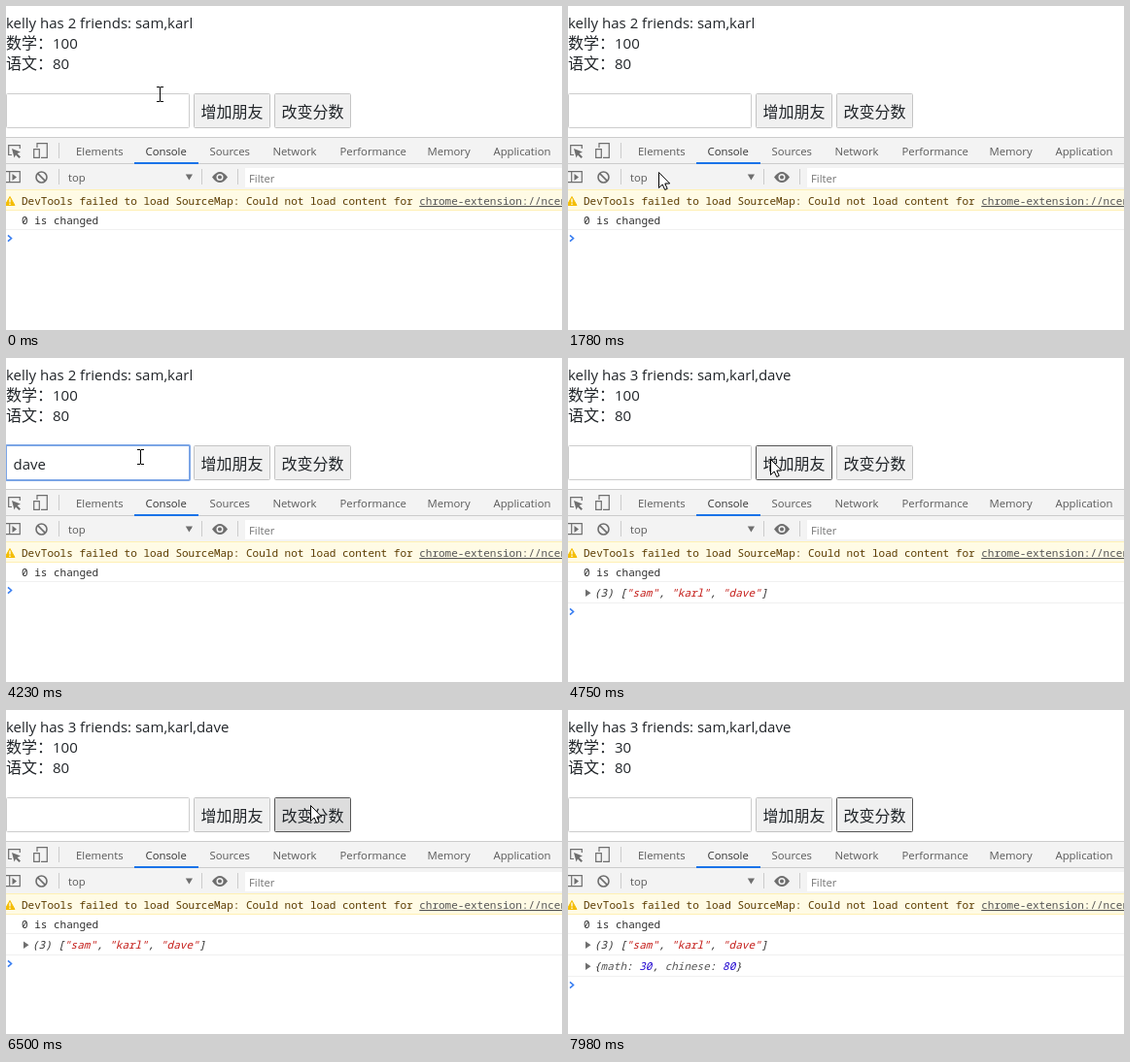
Write an HTML page that moves like this. It is 572 px wide and 334 px high and loops after 8.1 s.

```html
<!DOCTYPE html>
<html lang="zh">
<head>
<meta charset="utf-8">
<style>
  html, body { margin: 0; width: 572px; height: 334px; overflow: hidden; background: #fff; }
  svg { display: block; }
  text { white-space: pre; }
  .page { font: 15px "Open Sans", sans-serif; fill: #212529; }
  .cjk { font: 16px "Noto Sans CJK SC", "Noto Sans CJK", sans-serif; fill: #212529; }
  .ui { font: 11.3px "Open Sans", sans-serif; fill: #5a5a5a; }
  .mono { font: 11px "Noto Sans Mono", monospace; fill: #303030; }
  .value { font-style: italic; }
  .str { fill: #c41a16; }
  .num { fill: #1c00cf; }
  .key { fill: #565656; }
  .icon { fill: none; stroke: #6e6e6e; stroke-width: 1.2; }
  .solid { fill: #6e6e6e; }
  .line { stroke: #ccc; }
  .row { stroke: #f0f0f0; }
</style>
</head>
<body>
<svg width="572" height="334" viewBox="0 0 572 334">
  <text id="friends" class="page" y="23"></text>
  <text class="cjk" y="44">数学：</text><text id="math" class="page" x="48" y="43.500"></text>
  <text class="cjk" y="65">语文：</text><text class="page" x="48" y="64.500">80</text>

  <rect id="field" fill="#fff"/>
  <text id="typed" class="page" x="7.500" y="114.500"></text>
  <path id="caret" stroke="#000"/>
  <rect id="add" x="193.5" y="90.5" width="78" height="35" rx="1"/>
  <text class="cjk" x="200.500" y="115">增加朋友</text>
  <rect id="change" x="276.5" y="90.5" width="78" height="35" rx="1"/>
  <text class="cjk" x="283.500" y="115">改变分数</text>

  <rect y="135" width="572" height="54" fill="#f3f3f3"/>
  <path class="line" d="M0 135.500H572M0 162.500H572M54.500 141V157M54.500 168V184M201.500 168V184M238.500 168V184"/>
  <rect x="132" y="161" width="66" height="2" fill="#1a73e8"/>
  <g id="tabs" class="ui"></g>
  <g class="icon">
    <path d="M6 153.500H2.700V143.700H14.300V147"/>
    <path d="M32 146V141.700H42.300V156.300H36M28.700 147.700H34.300V156.300H28.700Z"/>
    <path d="M0 170.700H14.300V181.700H0M3.700 170V182"/>
    <circle cx="36.500" cy="176.500" r="5.500" stroke-width="1.600"/><path d="M32.600 172.600L40.400 180.400" stroke-width="1.600"/>
  </g>
  <g class="solid">
    <path d="M6 147L15 150.500 11.500 152 15 155.500 13.500 157 10 153.500 8.500 156.500Z"/>
    <path d="M6.500 173V180L11 176.500Z"/>
    <path d="M184.800 173.500H192L188.400 179.500Z"/>
    <path d="M212 176.500Q220 165.500 228 176.500Q220 187.500 212 176.500Z"/>
  </g>
  <circle cx="220" cy="176.500" r="2.800" fill="#6e6e6e" stroke="#f3f3f3" stroke-width="1.500"/>
  <text class="ui" x="64" y="181">top</text>
  <rect x="246" y="167" width="326" height="20" fill="#fff"/>
  <text class="ui" x="250" y="182" style="fill:#757575">Filter</text>

  <rect y="189" width="572" height="22" fill="#fffbe5"/>
  <path d="M0 189.500H572M0 210.500H572" stroke="#fff0b3"/>
  <path d="M-1 205.500L4 196.500 9 205.500Z" fill="#f4bd00" stroke="#f4bd00" stroke-linejoin="round"/>
  <path d="M4 198.500V202.500M4 203.500V205" stroke="#fff" stroke-width="1.300"/>
  <text class="mono" x="16" y="205" style="fill:#5c3c00">DevTools failed to load SourceMap: Could not load content for <tspan fill="#545454" text-decoration="underline">chrome-extension://ncennf</tspan></text>
  <text class="mono" x="16" y="225">0 is changed</text>
  <path class="row" d="M0 230.500H572"/>
  <g id="listRow">
    <path class="solid" d="M18 238.500V246L23.500 242.200Z"/>
    <text class="mono value" x="27" y="246">(3) [<tspan class="str">"sam"</tspan>, <tspan class="str">"karl"</tspan>, <tspan class="str">"dave"</tspan>]</text>
    <path class="row" d="M0 252.500H572"/>
  </g>
  <g id="scoreRow">
    <path class="solid" d="M18 260.500V268L23.500 264.200Z"/>
    <text class="mono value" x="27" y="268">{<tspan class="key">math</tspan>: <tspan class="num">30</tspan>, <tspan class="key">chinese</tspan>: <tspan class="num">80</tspan>}</text>
    <path class="row" d="M0 274.500H572"/>
  </g>
  <path id="prompt" d="M2 -3.200L5.500 0 2 3.200" fill="none" stroke="#367cf1" stroke-width="1.600"/>

  <path id="arrow" d="M.5 .5V16.500L4.200 13 6.700 18.500 9.200 17.400 6.800 12H11.700Z" fill="#fff" stroke="#000"/>
  <path id="beam" d="M-3 -7.500H0L.5 -7 1 -7.500H4M.5 -7V7M-3 7.500H0L.5 7 1 7.500H4" fill="none" stroke="#000"/>
</svg>
<script>
const LOOP = 8100;
const $ = id => document.getElementById(id);
const set = (id, attrs) => {
  for (const name in attrs) $(id).setAttribute(name, attrs[name]);
};
const show = (id, on) => set(id, { visibility: on ? 'visible' : 'hidden' });

const tabs = { Elements: 72, Console: 143.5, Sources: 209.5, Network: 274.5, Performance: 343.5, Memory: 433.5, Application: 501.5 };
$('tabs').innerHTML = Object.entries(tabs).map(([name, x]) =>
  `<text x="${x}" y="153.500"${name === 'Console' ? ' style="fill:#333"' : ''}>${name}</text>`).join('');

// Pointer moves: start time, x, y, shape
const A = 'arrow', I = 'beam';
const moves = [
  [0, 158, 91, I], [530, 150, 91, I], [670, 132, 82, A], [810, 110, 75, A], [950, 92, 70, A], [1100, 80, 68, A],
  [1780, 93, 171, A], [1900, 62, 190, A], [2040, 100, 202, A], [2180, 194, 172, A], [2330, 178, 130, A], [2470, 140, 104, I],
  [2750, 132, 102, I], [4230, 138, 102, I], [4360, 170, 104, I], [4490, 200, 104, A], [4620, 208, 104, A],
  [5020, 207, 70, A], [5150, 190, 14, I], [5280, 110, 9, I], [5400, 48, 12, I], [5530, 90, 20, I],
  [5930, 120, 42, A], [6070, 200, 75, A], [6210, 280, 96, A], [6360, 313, 98, A],
  [6800, 210, 66, A], [6960, 100, 45, A], [7080, 75, 40, A], [7230, 51, 41, I],
  [7500, 200, 120, A], [7650, 380, 230, A], [7820, 535, 318, A], [7980, 0, 0, null]
];

function paintButton(id, focused, pressed) {
  set(id, {
    fill: pressed ? '#ddd' : '#f0f0f0',
    stroke: focused ? '#555' : '#c4c4c4'
  });
}

function draw(t) {
  const [, x, y, shape] = moves.findLast(move => move[0] <= t);
  const added = t >= 4750, changed = t >= 6650;

  $('friends').textContent = 'kelly has ' + (added ? '3 friends: sam,karl,dave' : '2 friends: sam,karl');
  $('math').textContent = changed ? '30' : '100';
  $('typed').textContent = added || t < 3420 ? '' : t < 3700 ? 'da' : 'dave';

  const focused = t >= 2870 && t < 4620;
  set('field', focused
    ? { x: 0, y: 90, width: 189, height: 36, rx: 1, stroke: '#7ba5e6', 'stroke-width': 2 }
    : { x: .5, y: 90.5, width: 188, height: 35, rx: 1, stroke: '#ccc', 'stroke-width': 1 });
  show('caret', t >= 2870 && t < 3700);
  set('caret', { d: `M${t < 3420 ? 7.5 : 25.5} 98V119` });
  paintButton('add', t >= 4620 && t < 6500, t >= 4620 && !added);
  paintButton('change', t >= 6500, t >= 6500 && !changed);

  show('listRow', added);
  show('scoreRow', changed);
  set('prompt', { transform: `translate(0 ${239.5 + 22 * (added + changed)})` });

  for (const id of [A, I]) {
    show(id, id === shape);
    set(id, { transform: `translate(${x} ${y})` });
  }
}

let start;
function tick(now) {
  start ??= now;
  draw((now - start) % LOOP);
  requestAnimationFrame(tick);
}
draw(0);
requestAnimationFrame(tick);
</script>
</body>
</html>
```
